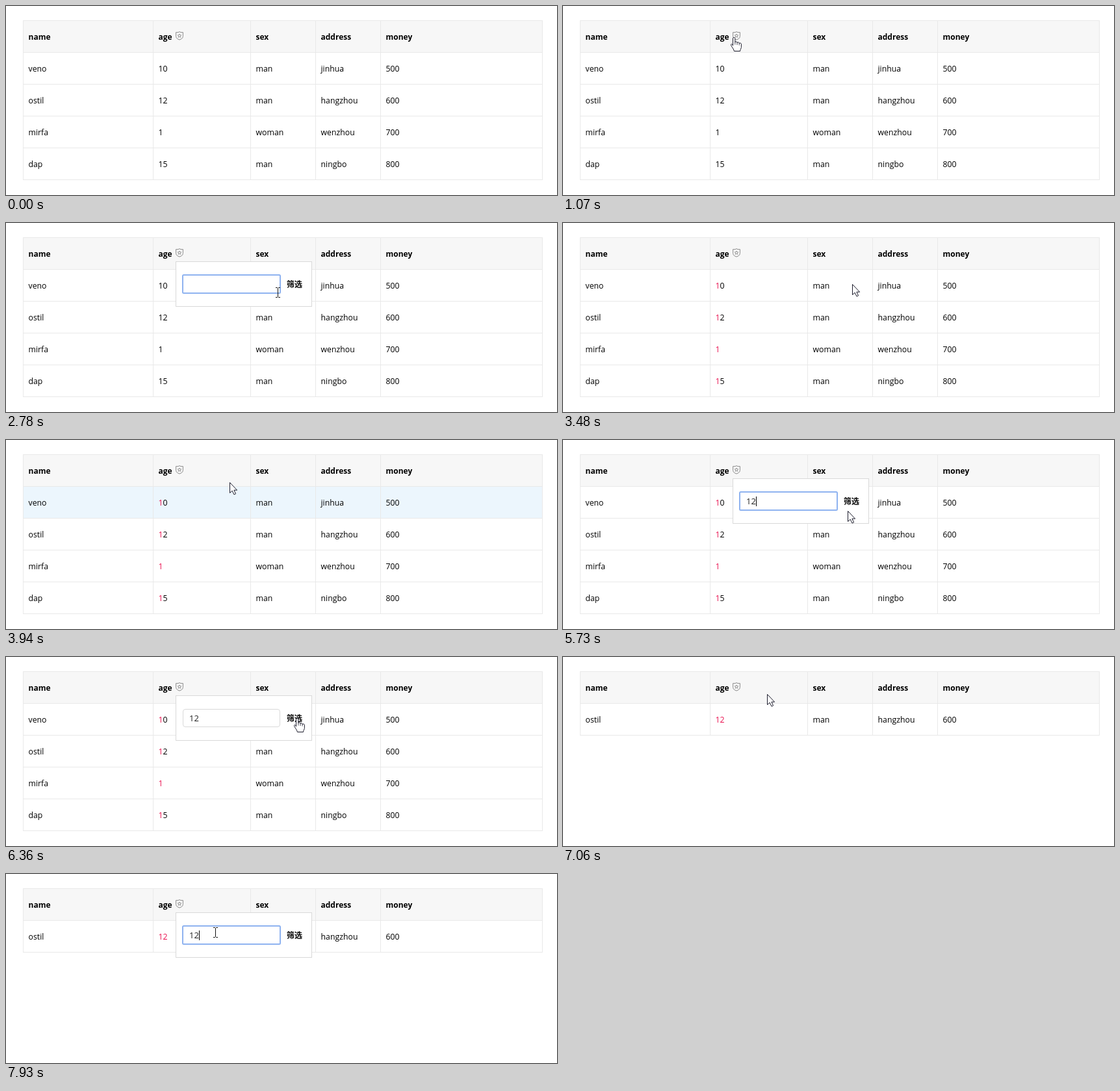
Write an HTML page that moves like this. It is 848x291 px and loops after 8 s.

```html
<!DOCTYPE html>
<html lang="en">
<head>
<meta charset="utf-8">
<title>Table filter</title>
<style>
  html, body { margin: 0; width: 100%; height: 100%; overflow: hidden; background: #fff; }
  svg { display: block; width: 848px; height: 291px; }
  text { font: 12.3px "Open Sans", "Noto Sans", sans-serif; fill: #000; }
  .head text { font-size: 12px; font-weight: 700; }
  .hit { fill: #ea1250; }
  .grid { fill: none; stroke: #e9e9e9; }
  #popup .btn { font: 700 12px "Noto Sans CJK SC", "Noto Sans CJK", sans-serif; }
  #value { font-size: 13px; fill: #222; }
</style>
</head>
<body>
<svg viewBox="0 0 848 291">
  <rect x="26" y="22" width="800" height="49" fill="#f7f7f7"/>
  <rect id="hover" x="27" y="72" width="798" height="48" fill="#ecf6fd" opacity="0"/>
  <path id="grid" class="grid"/>
  <g id="head" class="head"></g>
  <g fill="none" stroke="#8c8c8c" stroke-linejoin="round">
    <path d="M267 39.6L269 40.6H272.4V46.5C272.4 49.4 270 51 267 52C264 51 261.6 49.4 261.6 46.5V40.6H265Z"/>
    <path d="M267 43L267.8 44.8 269.8 45 268.3 46.3 268.8 48.2 267 47.2 265.2 48.2 265.7 46.3 264.2 45 266.2 44.8Z" stroke-width=".9"/>
  </g>
  <g id="body"></g>

  <g id="popup">
    <rect x="261.5" y="59.5" width="209" height="69" fill="#fff" stroke="#d9d9d9"/>
    <rect x="272.5" y="80.5" width="149" height="27" rx="3.5" fill="#fff" stroke="#d9d9d9"/>
    <rect id="focus" x="272" y="80" width="150" height="28" rx="1.5" fill="#fff" stroke="#8fb3f0" stroke-width="2"/>
    <rect id="select" x="282" y="86" width="7.5" height="17" fill="#3390ff"/>
    <text id="value" x="282" y="99"></text>
    <rect id="caret" y="87" width="1" height="15"/>
    <text class="btn" x="432" y="99" lang="zh-CN">筛选</text>
  </g>

  <g id="pointer">
    <path id="arrow" d="M.5 .5V16.5L4.2 13.2 7 19 9.6 17.8 6.9 12.2H11.6Z" fill="#fff" stroke="#1c1c2c"/>
    <g id="hand" fill="#fff" stroke="#1c1c2c" stroke-linejoin="round">
      <path d="M-2.5 13V1.8C-2.5 0 .8 0 .8 1.8V8C.8 6.4 4 6.5 4 8.2V9C4 7.4 7.2 7.6 7.2 9.2V10C7.2 8.5 10.4 8.8 10.4 10.6V15.5C10.4 17.5 8.6 18.5 8.6 21.5H-.6C-.6 18.5-5.5 14-5.5 11.6C-5.5 10-3.6 10-2.5 13Z"/>
      <path d="M.8 8V11.5M4 9V12M7.2 10V12.5" fill="none" stroke-width=".8"/>
    </g>
    <path id="beam" d="M-3-7.5H-.5L.5-6.5 1.5-7.5H4M.5-6.5V6.5M-3 7.5H-.5L.5 6.5 1.5 7.5H4" fill="none" stroke="#111"/>
  </g>
</svg>
<script>
const LOOP = 8000;
const $ = id => document.getElementById(id);
const cols = [26, 226, 376, 476, 576, 825];
const people = [
  ["veno", "10", "man", "jinhua", "500"],
  ["ostil", "12", "man", "hangzhou", "600"],
  ["mirfa", "1", "woman", "wenzhou", "700"],
  ["dap", "15", "man", "ningbo", "800"]
];

// Pointer moves: start, end, number of steps, target x, target y
const moves = [
  [380, 1070, 10, 264, 48],
  [1850, 2070, 4, 333, 90],
  [2470, 2780, 5, 418, 107],
  [2860, 2940, 2, 426, 106],
  [3020, 3250, 4, 445, 94],
  [3710, 4170, 7, 268, 44],
  [4630, 4950, 5, 311, 91],
  [5180, 5250, 2, 237, 97],
  [5330, 5560, 4, 435, 114],
  [5730, 5950, 4, 446, 95],
  [6100, 6360, 4, 449, 94],
  [6430, 6430, 1, 447, 93],
  [6600, 7150, 8, 270, 45],
  [7530, 7780, 4, 322, 90]
];

const within = (t, ...spans) => spans.some(([a, b]) => t >= a && t < b);
const show = (id, on) => $(id).setAttribute("visibility", on ? "inherit" : "hidden");
const cells = (row, y) =>
  row.map((s, i) => `<text x="${cols[i] + 8.5}" y="${y}">${s}</text>`).join("");

$("head").innerHTML = cells(["name", "age", "sex", "address", "money"], 52);

let shown = null;
function drawRows(filter) {
  if (filter === shown) return;
  shown = filter;
  const rows = people.filter(p => p[1].includes(filter));
  const bottom = 71.5 + 49 * rows.length;
  let d = cols.map(x => `M${x + .5} 22V${bottom + .5}`).join("");
  for (let y = 22.5; y <= bottom; y += 49) d += `M26 ${y}H826`;
  $("grid").setAttribute("d", d);
  $("body").innerHTML = rows.map((p, i) => {
    const row = [...p];
    if (filter) row[1] = p[1].replace(filter, `<tspan class="hit">${filter}</tspan>`);
    return cells(row, 101 + 49 * i);
  }).join("");
}

function pointerAt(t) {
  let x = 710, y = 291;
  for (const [a, b, n, tx, ty] of moves) {
    if (t < a) break;
    const step = n > 1 ? Math.floor((t - a) / (b - a) * (n - 1) + .01) : 0;
    const k = Math.min(1, (step + 1) / n);
    x += (tx - x) * k;
    y += (ty - y) * k;
  }
  return [Math.round(x), Math.round(y)];
}

function cursorFor(x, y, open, dragging) {
  const over = (l, top, r, b) => x >= l && x <= r && y >= top && y <= b;
  if (over(260, 38, 274, 53) || open && over(431, 86, 458, 104)) return "hand";
  return dragging || open && over(272, 80, 422, 108) ? "beam" : "arrow";
}

function render(t) {
  const open = within(t, [1530, 3400], [4550, 6430], [7360, LOOP]);
  const focus = within(t, [2220, 3400], [5100, 6100], [7860, LOOP]);
  const selected = within(t, [5180, 5400]);
  const value = t < 3020 ? "" : t < 5730 ? "1" : "12";
  drawRows(t < 3400 ? "" : t < 6430 ? "1" : "12");

  show("popup", open);
  show("focus", focus);
  show("select", selected);
  $("value").textContent = value;
  $("value").style.fill = selected ? "#fff" : "";

  // The caret blinks from the last click or key press
  const since = [7860, 5730, 5100, 3020, 2220].find(s => t >= s);
  show("caret", focus && !selected && (t - since) % 1000 < 500);
  $("caret").setAttribute("x", value ? 281 + 8 * value.length : 282);

  const fade = Math.min((t - 3710) / 150, (4100 - t) / 150, 1);
  $("hover").setAttribute("opacity", Math.max(0, fade));

  const [x, y] = pointerAt(t);
  const cursor = cursorFor(x, y, open, within(t, [5180, 5330]));
  show("pointer", t >= 380);
  $("pointer").setAttribute("transform", `translate(${x} ${y})`);
  for (const id of ["arrow", "hand", "beam"]) show(id, id === cursor);
}

const start = performance.now();
function tick() {
  render((performance.now() - start) % LOOP);
  requestAnimationFrame(tick);
}
tick();
</script>
</body>
</html>
```
